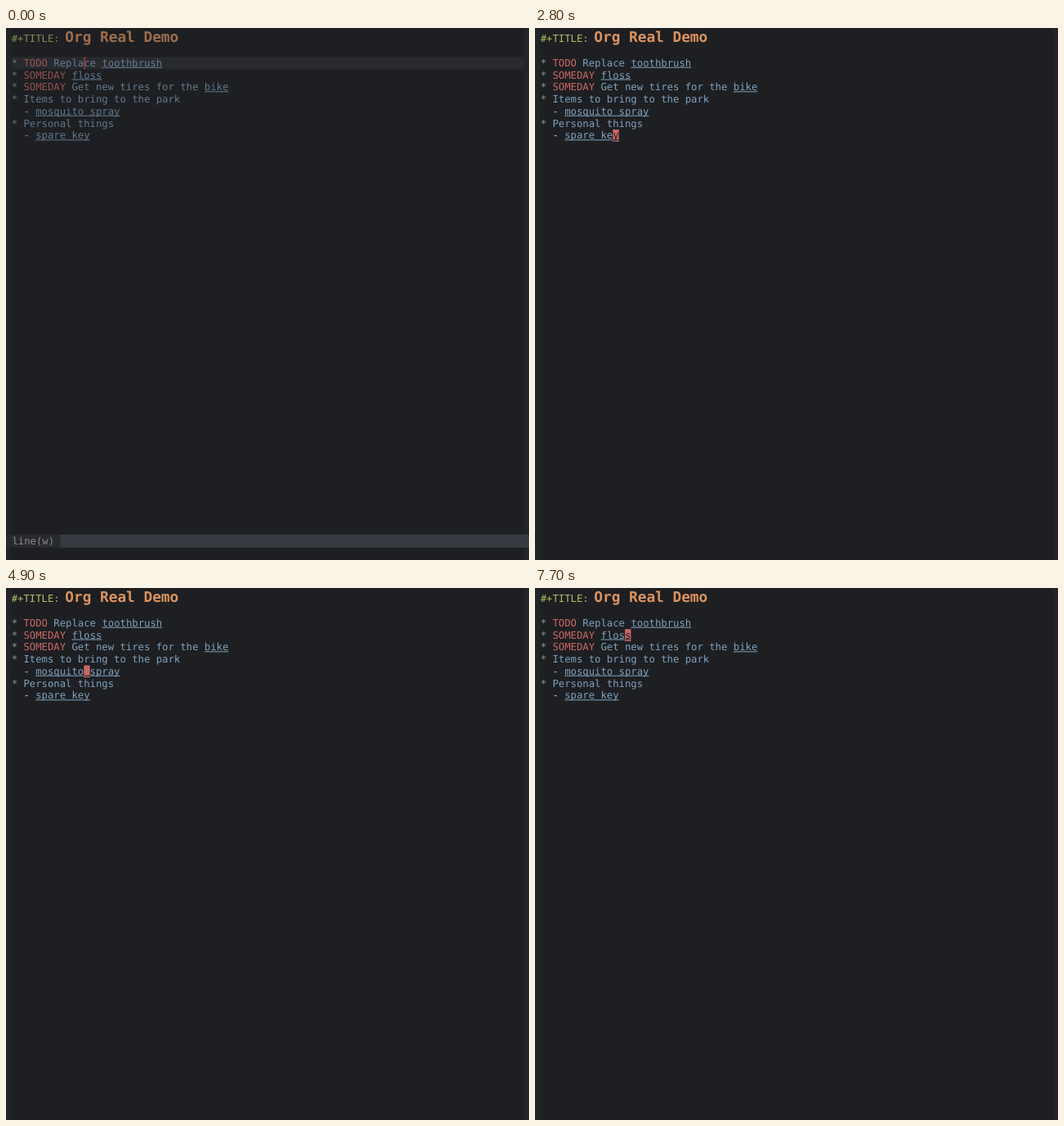
These frames come from a looping animation (640 by 650 pixels, 8000 ms). An HTML page with a canvas:

```html
<!DOCTYPE html>
<html lang="en">
<head>
<meta charset="utf-8">
<title>Org Real Demo</title>
<style>
html, body { margin: 0; width: 100%; height: 100%; overflow: hidden; background: #1d1f22; }
canvas { display: block; }
</style>
</head>
<body>
<canvas id="stage" width="640" height="650"></canvas>
<script>
const ctx = document.getElementById('stage').getContext('2d');
const LOOP = 8000, CW = 7.38, LH = 14.75, X0 = 6.7, TOP = 35.5, SIZE = 12.26, DIM = 0.68;
const C = {
  bg: '#1d1f22', fringe: '#232428', line: '#282a2e', mode: '#373b41',
  fg: '#c5c8c6', gray: '#969896', blue: '#81a2be', red: '#cc6666',
  green: '#b5bd68', orange: '#de935f', bar: '#d23c3c', mint: '#7fffd4', black: '#101214'
};

// Markup: !keyword!  _link_  @highlight@  %highlighted link%
const lines = [
  '* !TODO! Replace _toothbrush_',
  '* !SOMEDAY! _floss_',
  '* !SOMEDAY! Get new tires for the _bike_',
  '* Items to bring to the park',
  '  - _mosquito spray_',
  '* Personal things',
  '  - _spare key_'
];

// Boxes are [left, top, right, bottom] and labels [column, row, text], in cells
const popups = {
  key: {
    text: '  The @spare key@ is in the bottom drawer.', rows: 15,
    boxes: [[3, 3, 25, 12], [6, 7, 20, 11]],
    labels: [[6, 5, '_bottom drawer_'], [9, 9, '%spare key%']]
  },
  spray: {
    text: '  The @mosquito spray@ is in front of the sunscreen in the closet.', rows: 19,
    boxes: [[3, 3, 34, 16], [6, 7, 31, 15], [9, 11, 28, 15]],
    labels: [[6, 5, '_closet_'], [9, 9, '_sunscreen_'], [12, 13, '%mosquito spray%']]
  },
  bike: {
    text: '  The @bike@ is in the garage.', rows: 15,
    boxes: [[3, 3, 18, 12], [6, 7, 15, 11]],
    labels: [[6, 5, '_garage_'], [9, 9, '%bike%']]
  }
};

// [start, cursor style or popup, row, column]
const steps = [
  [0, 'bar', 0, 12], [900, 'bar', 1, 12], [1100, 'bar', 2, 12], [1200, 'bar', 3, 12],
  [1400, 'bar', 4, 12], [1500, 'bar', 5, 12], [1700, 'bar', 6, 12],
  [2100, 'key', 6, 12], [2800, 'block', 6, 12],
  [3300, 'bar', 5, 12], [3400, 'bar', 4, 12],
  [3900, 'spray', 4, 12], [4700, 'block', 4, 12],
  [5200, 'bar', 3, 12], [5400, 'bar', 2, 12], [5600, 'block', 2, 12], [5700, 'block', 2, 35],
  [6100, 'bike', 2, 35], [6900, 'block', 2, 35],
  [7400, 'bar', 1, 14], [7700, 'block', 1, 14]
];

const baseline = y => Math.round(y + 11.3);

function rect(x, y, w, h, color) {
  ctx.fillStyle = color;
  ctx.fillRect(x, y, w, h);
}

function outline(x, y, w, h, color) {
  ctx.strokeStyle = color;
  ctx.lineWidth = 1;
  ctx.strokeRect(x + 0.5, y + 0.5, w, h);
}

function text(s, x, y, color, font = SIZE + 'px') {
  ctx.font = font + ' "DejaVu Sans Mono", monospace';
  ctx.fillStyle = color;
  ctx.fillText(s, x, y);
}

function underline(x, y, w, color) {
  rect(x, y + 12.3, w, 1, color);
}

// Draws marked-up text in cells; y is the top of the row
function rich(markup, col, y, base) {
  for (const part of markup.split(/(!.*?!|_.*?_|@.*?@|%.*?%)/)) {
    if (!part) continue;
    const mark = '!_@%'.includes(part[0]) ? part[0] : '';
    const s = mark ? part.slice(1, -1) : part;
    const x = X0 + col * CW, w = s.length * CW;
    const lit = mark === '@' || mark === '%';
    const color = lit ? C.black : mark === '!' ? C.red : base;
    if (lit) rect(x, y, w, LH, C.mint);
    text(s, x, baseline(y), color);
    if (mark === '_' || mark === '%') underline(x, y, w, color);
    col += s.length;
  }
}

function drawBuffer(alpha) {
  ctx.globalAlpha = alpha;
  text('#+TITLE:', X0, 17, C.green);
  text('Org Real Demo', 72.3, 17, C.orange, 'bold 17.75px');
  lines.forEach((s, i) => {
    const y = TOP + i * LH, heading = s[0] === '*';
    if (heading) rich('*', 0, y, C.gray);
    else rich('-', 2, y, C.fg);
    const skip = heading ? 2 : 4;
    rich(s.slice(skip), skip, y, C.blue);
  });
  ctx.globalAlpha = 1;
}

function drawCursor(style, row, col, alpha) {
  const x = X0 + col * CW, y = TOP + row * LH;
  if (style === 'bar') {
    ctx.globalAlpha = alpha;
    rect(x, y, 1.8, LH, C.bar);
    ctx.globalAlpha = 1;
  } else if (style === 'block') {
    const ch = lines[row].replace(/[!_]/g, '')[col];
    rect(x, y, CW, LH, C.red);
    text(ch, x, baseline(y), C.bg);
    underline(x, y, CW, C.bg);
  } else {
    outline(x, y, CW - 1, LH - 1, C.red);
  }
}

function drawModeLine(alpha) {
  rect(0, 619, 640, 16, C.mode);
  rect(0, 619, 66.5, 16, C.line);
  ctx.globalAlpha = alpha;
  text('line(w)', 7.4, 631, C.gray);
  ctx.globalAlpha = 1;
}

function drawPopup(p, settled) {
  const top = 635 - p.rows * LH;
  rect(X0, top, CW, LH, C.red);
  rich(p.text, 0, top + LH, C.fg);
  const px = c => Math.floor(X0 + (c + 0.5) * CW);
  const py = r => Math.floor(top + (r + 0.5) * LH);
  for (const [l, t, r, b] of p.boxes) {
    outline(px(l), py(t), px(r) - px(l), py(b) - py(t), C.fg);
  }
  for (const [c, r, s] of p.labels) rich(s, c, top + r * LH, C.fg);
  if (settled) text('Truncate long lines enabled', X0, 647, C.fg);
}

function draw(t) {
  const [start, style, row, col] = steps.findLast(s => s[0] <= t);
  const popup = popups[style], settled = t - start >= 100;
  // The first view brightens in three jumps
  const wake = Math.min(3, Math.max(0, Math.floor((t - 300) / 100))) / 3;
  const alpha = popup ? (settled ? DIM : (1 + DIM) / 2) : DIM + (1 - DIM) * wake;

  rect(0, 0, 640, 650, C.bg);
  rect(0, 0, 6.5, 650, C.fringe);
  rect(634, 0, 6, 650, C.fringe);
  if (style === 'bar') rect(6.5, TOP + row * LH, 627.5, LH, C.line);
  drawBuffer(alpha);
  drawCursor(style, row, col, alpha);
  if (style === 'bar') drawModeLine(0.9 + 0.1 * wake);
  if (popup) drawPopup(popup, settled);
}

ctx.textRendering = 'geometricPrecision';
function tick() {
  draw(performance.now() % LOOP);
  requestAnimationFrame(tick);
}
tick();
</script>
</body>
</html>
```
